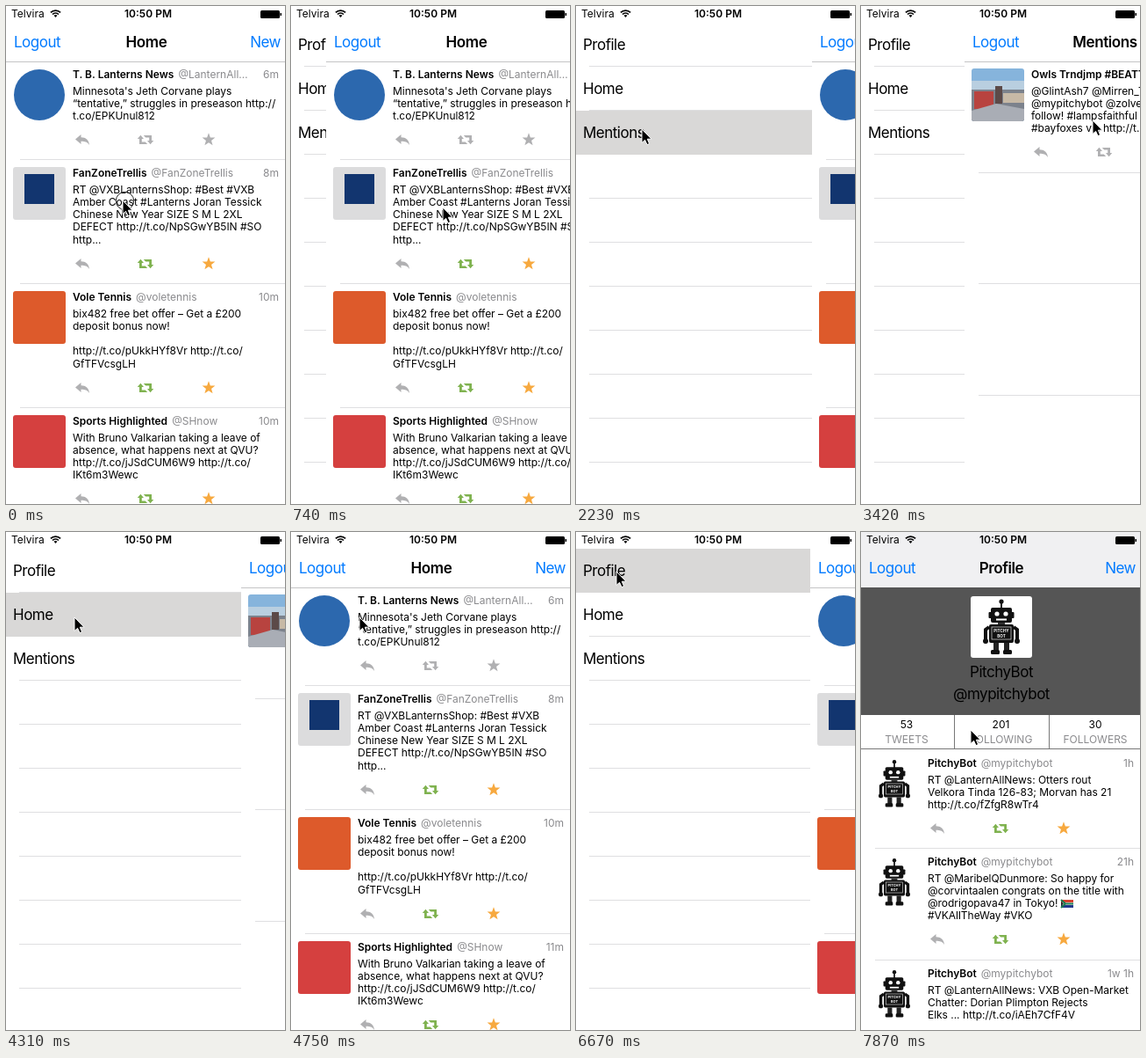
These frames come from a looping animation (318x566 px, 8000 ms). An HTML page:

```html
<!DOCTYPE html>
<html lang="en">
<head>
<meta charset="utf-8">
<title>Timeline with slide-out menu</title>
<style>
html, body { margin: 0; width: 100%; height: 100%; overflow: hidden; background: #fff; }
body { font: 12px/14.32px Inter, "Open Sans", sans-serif; color: #000; white-space: nowrap; }
#stage { position: relative; width: 318px; height: 566px; overflow: hidden; background: #fff; }
#stage div, #stage svg { position: absolute; }
svg { overflow: visible; }
.view { left: 0; top: 0; width: 318px; height: 566px; background: #fff; overflow: hidden; }
.nav { left: 0; top: 0; width: 318px; height: 63px; background: #fff; border-bottom: 1px solid #c4c4c6; }
.big { font-size: 17px; line-height: 20px; letter-spacing: -.5px; }
.nav .big { top: 31px; color: #007aff; }
.nav .title { left: 1px; width: 318px; text-align: center; color: #000; font-weight: 600; letter-spacing: -.4px; }
.line { height: 1px; background: #dfdfe1; right: 0; }
.row { left: 0; width: 318px; }
.pic { left: 8px; top: 8px; width: 60px; height: 60px; border-radius: 3px; overflow: hidden; }
.head { left: 76px; top: 7.5px; width: 235px; display: flex; color: #8a8a8d; }
.head b { color: #000; font-weight: 600; margin-right: 5px; }
.head i { font-style: normal; flex: 1; min-width: 0; overflow: hidden; text-overflow: ellipsis; margin-right: 10px; }
.text { left: 76px; top: 26.5px; letter-spacing: -.03px; }
#stage .text svg { position: static; vertical-align: -1px; }
.item { left: 0; width: 318px; height: 50px; }
.item .big { left: 8px; line-height: 50px; }
.item .line { left: 15px; top: 49px; }
.item.on { background: #d9d8d7; }
.item.on .line { display: none; }
.mid { left: 0; width: 318px; text-align: center; }
.stat { width: 106px; text-align: center; }
.stat span { color: #8a8a8d; position: absolute; left: 0; width: 100%; top: 17px; }
</style>
</head>
<body>
<div id="stage"></div>
<script>
const GREY = '#b0b0b2', GREEN = '#7fb24f', GOLD = '#f7a93f';
const REPLY = 'M-8-.5L-1.5-6V-2.8C4-2.8 7.5 0 8 6C5.5 2.5 3 1.8-1.5 1.8V5z';
const HALF = 'M-9.2-1L-5.6-5.2L-2-1H-4.2V2.4H-.2L2.2 5H-7V-1z';
const STAR = 'M' + Array.from({ length: 10 }, (_, k) => {
  const r = k % 2 ? 3.2 : 7.8, a = k * Math.PI / 5;
  return (r * Math.sin(a)).toFixed(2) + ' ' + (-r * Math.cos(a)).toFixed(2);
}).join('L') + 'z';

const svg = (w, h, body, css = '', box = '') =>
  `<svg width="${w}" height="${h}" style="${css}" ${box && `viewBox="${box}"`}>${body}</svg>`;
const rect = (x, y, w, h, fill, r = 0) =>
  `<rect x="${x}" y="${y}" width="${w}" height="${h}" rx="${r}" fill="${fill}"/>`;
const disc = (x, y, r, fill) => `<circle cx="${x}" cy="${y}" r="${r}" fill="${fill}"/>`;
const line = (x, y) => `<div class="line" style="left:${x}px;top:${y}px"></div>`;

const limb = d => `<path d="${d}" fill="none" stroke="#111" stroke-width="4"/>`;
const robot = size => svg(size, size,
  rect(0, 0, 70, 70, '#fff') + disc(35, 6, 2.6, '#111') + rect(34, 7, 2, 8, '#111') +
  rect(23, 13, 24, 17, '#111', 2) + rect(20.5, 18, 29, 7, '#111', 1) +
  disc(30, 20, 2.6, '#fff') + disc(40, 20, 2.6, '#fff') + rect(29, 25.5, 12, 2, '#fff') +
  rect(31, 30, 8, 3, '#333') + rect(21, 32, 28, 21, '#111', 2) +
  '<rect x="24" y="35" width="22" height="14" fill="none" stroke="#ddd" stroke-width=".7"/>' +
  '<g fill="#fff" font-size="4.6" font-weight="700" text-anchor="middle"><text x="35" y="41">PITCHY</text><text x="35" y="46.5">BOT</text></g>' +
  limb('M21 35L17 38V49') + limb('M49 35L53 38V49') +
  disc(17, 51, 3, '#111') + disc(53, 51, 3, '#111') +
  rect(26, 53, 6, 9, '#222') + rect(38, 53, 6, 9, '#222') +
  rect(23, 61, 10, 5, '#111', 1.5) + rect(37, 61, 10, 5, '#111', 1.5), '', '0 0 70 70');

const tile = body => svg(60, 60, body);
const pics = {
  blue: tile(rect(0, 0, 60, 60, '#fff') + disc(30, 30, 29, '#2c68ae')),
  navy: tile(rect(0, 0, 60, 60, '#dcdcdd') + rect(13, 8, 34, 34, '#12356f')),
  orange: tile(rect(0, 0, 60, 60, '#dd5a2b')),
  red: tile(rect(0, 0, 60, 60, '#d5403f')),
  photo: tile(rect(0, 0, 60, 60, '#86b4dc') + rect(0, 14, 60, 12, '#b9cfe0') +
    rect(0, 24, 60, 36, '#7c828c') + rect(3, 26, 22, 20, '#b8433f') + rect(27, 20, 8, 20, '#5c4a48') +
    rect(36, 28, 24, 11, '#c7b9a6') + '<path d="M0 60V48L28 40L60 46V60z" fill="#a9adb5"/>'),
  robot: robot(60)
};

function tweet(y, pic, name, user, age, lines, colors) {
  const marks = [[11, REPLY, GREY], [83, HALF, colors[0]], [155, STAR, colors[1]]];
  const icons = marks.map(([x, d, c]) => `<g transform="translate(${x})" fill="${c}"><path d="${d}"/>` +
    (d === HALF ? `<path d="${d}" transform="rotate(180)"/>` : '') + '</g>').join('');
  return `<div class="row" style="top:${y}px"><div class="pic">${pics[pic]}</div>` +
    `<div class="head"><b>${name}</b><i>${user}</i><span>${age}</span></div>` +
    `<div class="text">${lines.join('<br>')}</div>` +
    svg(1, 1, icons, `left:76px;top:${46 + 14.32 * lines.length}px`) + '</div>';
}

const nav = (title, bg = '') => `<div class="nav" style="${bg}"><div class="big" style="left:9px">Logout</div>` +
  `<div class="big title">${title}</div><div class="big" style="right:5px">New</div></div>`;
const view = (id, body) => `<div class="view" id="${id}">${body}</div>`;

const off = [GREY, GREY], on = [GREEN, GOLD];
const home = nav('Home') +
  tweet(63, 'blue', 'T. B. Lanterns News', '@LanternAllNews', '6m',
    ["Minnesota's Jeth Corvane plays", '“tentative,” struggles in preseason http://', 't.co/EPKUnul812'], off) +
  tweet(175, 'navy', 'FanZoneTrellis', '@FanZoneTrellis', '8m',
    ['RT @VXBLanternsShop: #Best #VXB', 'Amber Coast #Lanterns Joran Tessick', 'Chinese New Year SIZE S M L 2XL',
      'DEFECT http://t.co/NpSGwYB5IN #SO', 'http...'], on) +
  tweet(316, 'orange', 'Vole Tennis', '@voletennis', '10m',
    ['bix482 free bet offer – Get a £200', 'deposit bonus now!', '', 'http://t.co/pUkkHYf8Vr http://t.co/', 'GfTFVcsgLH'], on) +
  tweet(457, 'red', 'Sports Highlighted', '@SHnow', '<span id="age">10m</span>',
    ['With Bruno Valkarian taking a leave of', 'absence, what happens next at QVU?',
      'http://t.co/jJSdCUM6W9 http://t.co/', 'IKt6m3Wewc'], on) +
  [174, 315, 456].map(y => line(16, y)).join('');

const mentions = nav('Mentions') +
  tweet(63, 'photo', 'Owls Trndjmp #BEATTHEM', '@owlstrndjmp', '2h',
    ['@GlintAsh7 @Mirren_Tate', '@mypitchybot @zolvek thanks for the', 'follow! #lampsfaithful #owls',
      '#bayfoxes via http://t.co/Qm4LrT82xe'], off) +
  [189, 315, 442].map(y => line(16, y)).join('');

const flag = svg(14, 9, rect(0, 0, 14, 9, '#fff') + rect(0, 0, 14, 3, '#d8402f') + rect(0, 6, 14, 3, '#20388c') +
  '<path d="M0 0L5 4.5H14M0 9L5 4.5" fill="none" stroke="#1c7a4e" stroke-width="2"/><path d="M0 2L3 4.5L0 7z" fill="#222"/>');
const stats = [[53, 'TWEETS'], [201, 'FOLLOWING'], [30, 'FOLLOWERS']];
const bot = (y, age, lines) => tweet(y, 'robot', 'PitchyBot', '@mypitchybot', age, lines, on);
const profile = nav('Profile', 'background:#f0f0f2;border-color:#555') +
  '<div style="left:0;top:63px;width:318px;height:145px;background:#555"></div>' +
  `<div class="pic" style="left:125px;top:73px;width:70px;height:70px">${robot(70)}</div>` +
  '<div class="mid big" style="top:149px;left:1px">PitchyBot</div><div class="mid big" style="top:174px;left:1px">@mypitchybot</div>' +
  stats.map(([n, t], k) => `<div class="stat" style="left:${k * 107.5 - 1}px;top:211.5px">${n}<span>${t}</span></div>`).join('') +
  [105.5, 213.5].map(x => `<div style="left:${x}px;top:208px;width:1px;height:39px;background:#777"></div>`).join('') +
  '<div style="left:0;top:246px;width:318px;height:1px;background:#777"></div>' +
  bot(248, '1h', ['RT @LanternAllNews: Otters rout', 'Velkora Tinda 126-83; Morvan has 21', 'http://t.co/fZfgR8wTr4']) +
  bot(360, '21h', ['RT @MaribelQDunmore: So happy for', '@corvintaalen congrats on the title with',
    `@rodrigopava47 in Tokyo! ${flag}`, '#VKAllTheWay #VKO']) +
  bot(487, '1w 1h', ['RT @LanternAllNews: VXB Open-Market', 'Chatter: Dorian Plimpton Rejects', 'Elks ... http://t.co/iAEh7CfF4V']) +
  line(16, 359) + line(16, 486);

const menu = Array.from({ length: 10 }, (_, k) => `<div class="item" style="top:${19 + 50 * k}px">` +
  `<div class="big">${['Profile', 'Home', 'Mentions'][k] || ''}</div><div class="line"></div></div>`).join('');

const arc = r => `<path d="M${-r * .7} ${-r * .7}A${r} ${r} 0 0 1 ${r * .7} ${-r * .7}" fill="none" stroke="#000" stroke-width="1.7"/>`;
const status = '<div style="left:6px;top:2px">Telvira</div>' +
  svg(1, 1, `<g transform="translate(56.5 13)">${arc(8)}${arc(5)}<path d="M0 0L-2-2.2A3 3 0 0 1 2-2.2z"/></g>`, 'left:0;top:0') +
  '<div class="mid" style="top:2px;left:3px;font-weight:600">10:50 PM</div>' +
  svg(1, 1, rect(290, 5, 22, 9, '#000', 1.5) + rect(312.5, 8, 1.5, 3, '#000'), 'left:0;top:0');

const $ = id => document.getElementById(id);
$('stage').innerHTML = menu + view('home', home) + view('mentions', mentions) + view('profile', profile) + status +
  svg(1, 1, '<circle id="ring" cx="135.5" cy="221.5" r="10.2" fill="none" stroke="#222"/>' +
    '<path id="arrow" d="M0 0V15.5L3.6 12.3L6 17.6L8.6 16.5L6.3 11.2H11z" stroke="#fff" stroke-width="1"/>', 'left:0;top:0');

// Tracks: [tick, value...], linear between entries.
const LOOP = 8000, TICKS = 54;
const slide = [[3, 0], [4, 14], [5, 40], [6, 98], [7, 198], [8, 258], [9, 269], [15, 269], [16, 90], [17, 0],
  [20, 0], [21, 10], [22, 50], [23, 118], [24, 220], [25, 268], [30, 268], [31, 70], [32, 0],
  [34, 0], [35, 8], [36, 43], [38, 210], [39, 260], [40, 267], [45, 267], [46, 80], [47, 0]];
const pointer = [[0, 133, 221], [1, 133, 229], [3, 133, 229], [5, 173, 229], [6, 222, 229], [7, 232, 229], [8, 225, 215],
  [11, 75, 140], [17, 75, 140], [20, 146, 131], [21, 156, 131], [23, 264, 130], [24, 290, 130], [28, 78, 97],
  [32, 78, 97], [34, 92, 120], [36, 135, 122], [38, 270, 120], [41, 46, 45], [51, 46, 45], [53, 125, 225]];

function at(track, i) {
  const n = track.findIndex(k => k[0] >= i);
  if (n < 0) return track[track.length - 1].slice(1);
  if (!n) return track[0].slice(1);
  const a = track[n - 1], b = track[n], p = (i - a[0]) / (b[0] - a[0]);
  return a.slice(1).map((v, k) => v + (b[k + 1] - v) * p);
}

const items = document.querySelectorAll('.item');
const within = (i, a, b) => i >= a && i <= b;
const start = performance.now();

function draw(now) {
  const t = Math.max(0, now - start) % LOOP;
  const i = Math.floor((t + 8) * TICKS / LOOP) % TICKS;
  const x = Math.round(at(slide, i)[0]), [px, py] = at(pointer, i);
  const screen = i >= 46 ? 'profile' : within(i, 16, 30) ? 'mentions' : 'home';
  for (const id of ['home', 'mentions', 'profile']) {
    $(id).style.display = id === screen ? 'block' : 'none';
    $(id).style.transform = `translateX(${x}px)`;
  }
  const pick = within(i, 14, 16) ? 2 : within(i, 29, 31) ? 1 : within(i, 44, 46) ? 0 : -1;
  items.forEach((el, k) => {
    el.classList.toggle('on', k === pick);
    el.style.width = (x || 318) + 'px';
  });
  $('age').textContent = i >= 31 ? '11m' : '10m';
  $('ring').style.display = i ? 'none' : '';
  $('arrow').setAttribute('transform', `translate(${px} ${py})`);
  requestAnimationFrame(draw);
}
draw(start);
</script>
</body>
</html>
```
